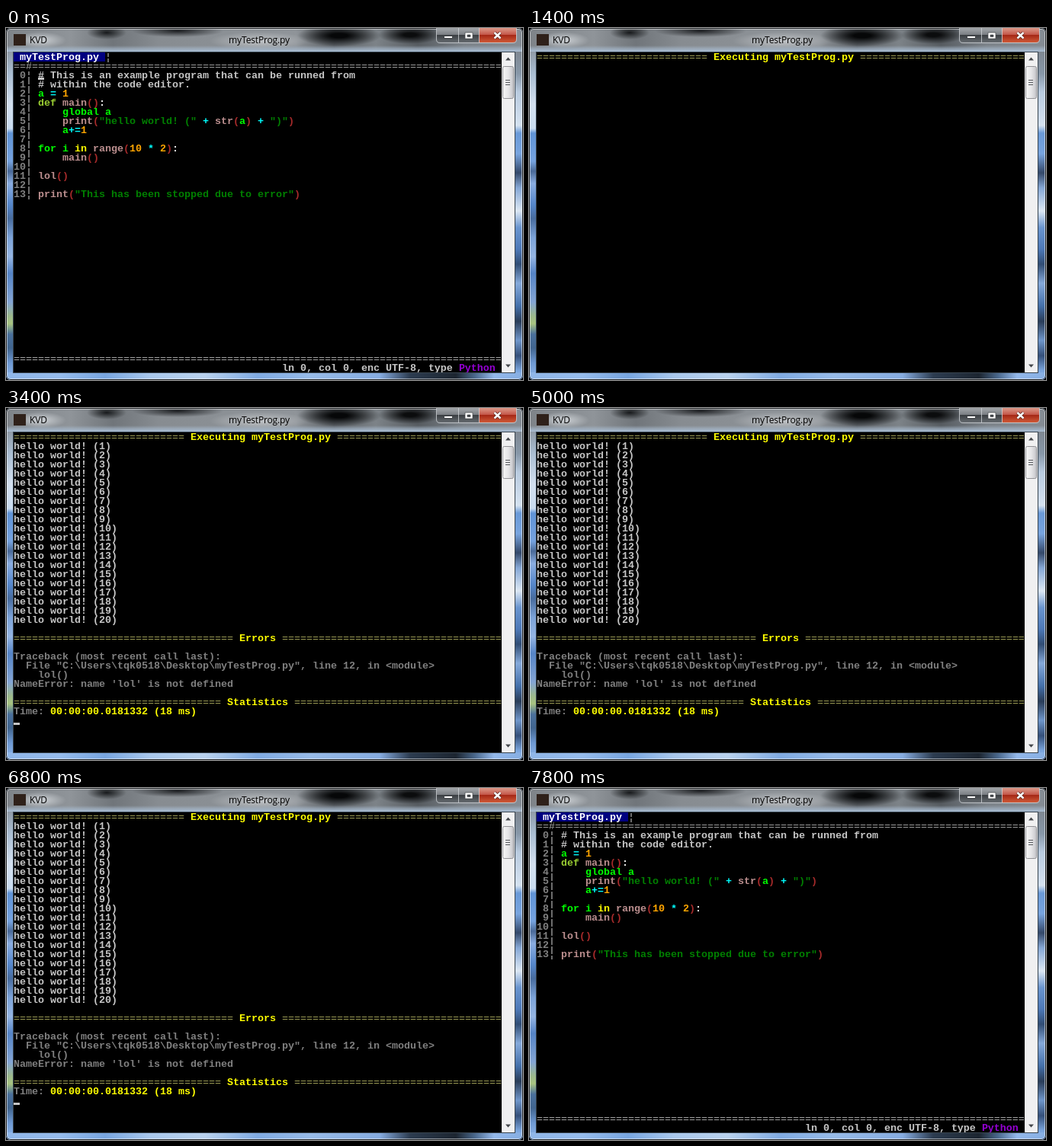
An HTML page that plays this animation: 678 px wide and 462 px high, repeating every 8 s.

```html
<!DOCTYPE html>
<html lang="en">
<head>
<meta charset="utf-8">
<title>myTestProg.py</title>
<style>
html, body { margin: 0; width: 100%; height: 100%; overflow: hidden; background: #000; }
#stage { position: relative; width: 678px; height: 462px; overflow: hidden; background: #000; }
#stage div, #stage svg { position: absolute; }

/* glass frame */
.glass { inset: 0; overflow: hidden; border-radius: 6px; background: #7aa6dc; }
.left, .right { top: 0; width: 10px; height: 462px; }
.left { left: 0; background: linear-gradient(#7b8189 0, #8f9aa6 30px, #a9bdd2 60px, #d3e0ef 100px,
  #c9dcf0 132px, #5f93d6 138px, #75a2de 175px, #4a6a98 188px, #8aade0 204px, #5586ca 232px, #486c9e 250px,
  #7ca3d8 275px, #95b5e2 300px, #5584c6 322px, #84a5d4 360px, #9cb98c 378px, #a8c480 388px, #4a709c 402px,
  #41658f 420px, #6f9ad4 440px, #8fb6e8 462px); }
.right { left: 668px; background: linear-gradient(#777d84 0, #808a95 35px, #8797a8 60px, #b9cbdf 84px,
  #d5e2f0 128px, #6a9ad8 138px, #78a4de 165px, #34496a 190px, #86a8d6 210px, #dce7f3 240px, #6a95cf 262px,
  #4d79b8 290px, #314d74 310px, #85a9da 335px, #4470aa 365px, #2a3d58 385px, #6f96ca 410px, #35507a 430px, #7ba6de 450px); }
.bottom { left: 0; top: 452px; width: 678px; height: 10px; background: linear-gradient(90deg,
  #8fb6e8 0, #96bcec 70px, #78a6e0 130px, #a9c8ec 190px, #b9d2ee 260px, #80abe2 330px, #97bbe8 400px,
  #86ace0 490px, #2c3c50 530px, #1c2530 590px, #4a688c 615px, #93b8ea 640px, #86aee2 678px); }
.title { left: 0; top: 0; width: 678px; height: 31px; background:
  linear-gradient(#0000 23px, #a3b4c6aa 27px, #a9bed4 31px),
  radial-gradient(34px 11px at 45px 16px, #d0d4d8 0, #d0d4d800 100%),
  radial-gradient(65px 12px at 332px 17px, #c0c3c6 0, #c0c3c600 100%),
  radial-gradient(26px 9px at 132px 6px, #17191b 0, #17191b00 100%),
  radial-gradient(60px 8px at 225px 4px, #1d1f22 0, #1d1f2200 100%),
  radial-gradient(55px 14px at 437px 10px, #060708 20%, #06070800 100%),
  radial-gradient(42px 12px at 530px 9px, #0b0c0d 20%, #0b0c0d00 100%),
  linear-gradient(90deg, #7e8388 0, #8f9499 85px, #70757a 140px, #878c91 200px, #8f9499 380px,
    #5a5f64 430px, #7d8388 485px, #565b60 540px, #7d848b 600px, #858c94 678px); }
.edge { inset: 0; box-sizing: border-box; border: 1px solid #202428; border-radius: 6px; box-shadow: inset 0 0 0 1px #ffffff88; }
.cap { top: 8px; font: 12px/16px "Open Sans", "Noto Sans", sans-serif; color: #000; white-space: nowrap; letter-spacing: -.15px; }
.icon { left: 10px; top: 8px; width: 16px; height: 15px; background: #2f211a; }

/* console */
.client { left: 9px; top: 31px; width: 659px; height: 422px; background: #000; border: 1px solid #38444f; box-sizing: border-box; }
.page { left: 10px; top: 32px; width: 640px; height: 420px; overflow: hidden; background: #000;
  font: bold 13.333px/14px "Liberation Mono", monospace; color: #c6c6c6; white-space: pre; }
.page .row { left: 0; height: 12px; }
.page i { font-style: normal; }
.page .tab { display: inline-block; height: 12px; background: #000080; color: #fff; }
.dim { color: #808080; }
.rule { color: #a9a9a9; font-weight: normal; }
.gold { color: #a9a95c; font-weight: normal; }
.yel { color: #ff0; }
.id { color: #0f0; }
.kw { color: #9acd32; }
.fn { color: #bc8f8f; }
.br { color: #a52a2a; }
.op { color: #0ff; }
.num { color: #ffa500; }
.str { color: #008000; }
.w { color: #fff; }
.py { color: #9400d3; }
#stage .cur { width: 8px; height: 3px; background: #c6c6c6; }
#editCur { left: 32px; top: 33px; }
#runCur { left: 0; top: 381px; }

#edit { animation: edit 8s step-end infinite; }
#editCur { animation: editCur 8s step-end infinite; }
#out { inset: 0; animation: out 8s step-end infinite; }
#runCur { animation: runCur 8s step-end infinite; }
@keyframes edit { 0%, 90% { visibility: visible; } 17.5% { visibility: hidden; } }
@keyframes editCur { 0%, 90% { opacity: 1; } 10%, 97.5% { opacity: 0; } }
@keyframes out { 0% { opacity: 0; } 20% { opacity: 1; } }
@keyframes runCur {
  0%, 37.5%, 50%, 62.5%, 75% { opacity: 0; }
  30%, 42.5%, 57.5%, 70%, 82.5% { opacity: 1; }
}
</style>
</head>
<body>
<div id="stage">
  <div class="glass">
    <div class="left"></div>
    <div class="right"></div>
    <div class="bottom"></div>
    <div class="title"></div>
    <div class="edge"></div>
  </div>
  <div class="icon"></div>
  <div class="cap" style="left:31px">KVD</div>
  <div class="cap" style="left:232px;width:200px;text-align:center">myTestProg.py</div>
  <div class="client"></div>

  <svg width="678" height="462" viewBox="0 0 678 462">
    <defs>
      <linearGradient id="btn" x2="0" y2="1">
        <stop stop-color="#a4a8ac"/><stop offset=".45" stop-color="#7b7f84"/>
        <stop offset=".5" stop-color="#3b3f43"/><stop offset="1" stop-color="#666b70"/>
      </linearGradient>
      <linearGradient id="red" x2="0" y2="1">
        <stop stop-color="#dd9a8a"/><stop offset=".45" stop-color="#c4584a"/>
        <stop offset=".5" stop-color="#a52816"/><stop offset="1" stop-color="#cf5a38"/>
      </linearGradient>
      <linearGradient id="thumb">
        <stop stop-color="#f6f6f6"/><stop offset=".5" stop-color="#e6e6e8"/><stop offset="1" stop-color="#c6c6ca"/>
      </linearGradient>
    </defs>
    <path d="M565 0H620V19H569Q565 19 565 15Z" fill="url(#btn)"/>
    <path d="M620 0H669V15Q669 19 665 19H620Z" fill="url(#red)"/>
    <path d="M564.5 0V15Q564.5 19.5 569 19.5H665Q669.5 19.5 669.5 15V0M593.5 0V19M620.5 0V19" fill="none" stroke="#d0d4d8" stroke-opacity=".8"/>
    <rect x="574.5" y="10.5" width="11" height="3" fill="#fff" stroke="#45484c"/>
    <path d="M602 6H612V14H602ZM605 9V11.500H609V9Z" fill="#fff" fill-rule="evenodd" stroke="#45484c" stroke-width=".7"/>
    <path d="M640.500 6L648.500 13.500M648.500 6L640.500 13.500" stroke="#56231c" stroke-width="4"/>
    <path d="M640.500 6L648.500 13.500M648.500 6L640.500 13.500" stroke="#fff" stroke-width="2.500"/>

    <rect x="650" y="32" width="17" height="420" fill="#f0f0f1"/>
    <path d="M655 42.500L658.500 38.500L662 42.500ZM655 441.500L658.500 445.500L662 441.500Z" fill="#44474b"/>
    <rect x="651.500" y="50.500" width="14" height="42" rx="2" fill="url(#thumb)" stroke="#929296"/>
    <path d="M655 68.500H661M655 71.500H661M655 74.500H661" stroke="#55585c"/>
  </svg>

  <div class="page" id="run"><div id="out"></div><div class="cur" id="runCur"></div></div>
  <div class="page" id="edit"><div class="cur" id="editCur"></div></div>
</div>
<script>
const $ = id => document.getElementById(id);

// Parts are [class, text] pairs or plain strings.
function row(page, n, ...parts) {
  const line = document.createElement("div");
  line.className = "row";
  line.style.top = n * 12 + "px";
  for (const part of parts) {
    const [cls, text] = Array.isArray(part) ? part : ["", part];
    const span = document.createElement("i");
    span.className = cls;
    span.textContent = text;
    line.append(span);
  }
  page.append(line);
}

function heading(page, n, text) {
  const lead = Math.ceil((78 - text.length) / 2);
  const left = lead - (text.length % 2 ? 0 : 0);
  row(page, n, ["gold", "=".repeat(left)], ["yel", ` ${text} `], ["gold", "=".repeat(78 - left - text.length)]);
}

const run = $("run"), out = $("out"), edit = $("edit");

heading(run, 0, "Executing myTestProg.py");
for (let i = 1; i <= 20; i++) row(out, i, `hello world! (${i})`);
heading(out, 22, "Errors");
[
  "Traceback (most recent call last):",
  '  File "C:\\Users\\tqk0518\\Desktop\\myTestProg.py", line 12, in <module>',
  "    lol()",
  "NameError: name 'lol' is not defined"
].forEach((text, i) => row(out, 24 + i, ["dim", text]));
heading(out, 29, "Statistics");
row(out, 30, ["dim", "Time: "], ["yel", "00:00:00.0181332 (18 ms)"]);

const id = t => ["id", t], fn = t => ["fn", t], br = t => ["br", t];
const op = t => ["op", t], num = t => ["num", t], str = t => ["str", t];
const tab = "    ", colon = ["w", ":"];
const code = [
  ["# This is an example program that can be runned from"],
  ["# within the code editor."],
  [id("a"), op(" = "), num("1")],
  [["kw", "def "], fn("main"), br("()"), colon],
  [tab, id("global a")],
  [tab, fn("print"), br("("), str('"hello world! ("'), op(" + "), fn("str"), br("("), id("a"), br(")"),
    op(" + "), str('")"'), br(")")],
  [tab, id("a"), op("+="), num("1")],
  [],
  [id("for i "), ["yel", "in "], fn("range"), br("("), num("10"), op(" * "), num("2"), br(")"), colon],
  [tab, fn("main"), br("()")],
  [],
  [fn("lol"), br("()")],
  [],
  [fn("print"), br("("), str('"This has been stopped due to error"'), br(")")]
];

row(edit, 0, ["tab", " myTestProg.py "], ["dim", "¦"]);
row(edit, 1, ["rule", "==#" + "=".repeat(77)]);
code.forEach((parts, i) => row(edit, i + 2, ["dim", String(i).padStart(2) + "¦ "], ...parts));
row(edit, 33, ["rule", "=".repeat(80)]);
row(edit, 34, " ".repeat(44) + "ln 0, col 0, enc UTF-8, type ", ["py", "Python"]);
</script>
</body>
</html>
```
